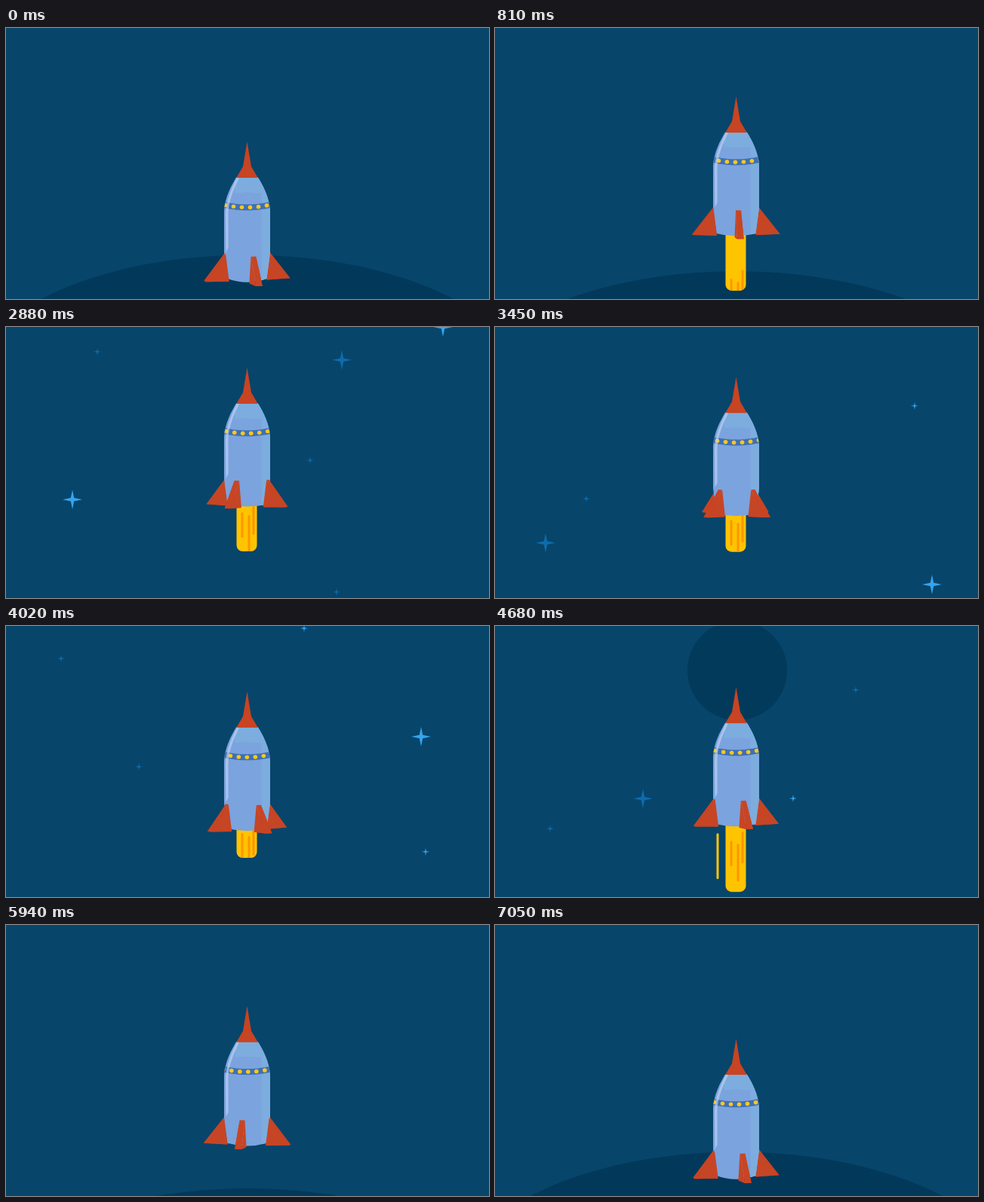
An HTML page with a canvas for the animation above (7.14 s loop, 640x360 px).

```html
<!DOCTYPE html>
<html>
<head>
<meta charset="utf-8">
<title>Rocket</title>
<style>
html, body { margin: 0; width: 100%; height: 100%; overflow: hidden; background: #07456b; }
canvas { display: block; }
</style>
</head>
<body>
<canvas id="stage" width="640" height="360"></canvas>
<script>
const c = document.getElementById('stage').getContext('2d');
const CX = 319.5, LOOP = 7140, LAST = 7050, STEP = 30, RAD = Math.PI / 180;
const SCROLL = 0.3424, JET = 0.2; // px per ms

// Key points: [time in ms, value]
const HEIGHT = [[0, 151], [1250, 68], [1900, 82], [2850, 54], [4460, 94], [5000, 58], [6800, 151]];
const SPIN = [[0, 0], [1740, 171], [4020, 464], [5940, 692], [7050, 810]];
const FLAME = [[200, 0], [900, 85], [2880, 60], [4020, 37], [4680, 88], [5300, 0]];

// Star layers; each star is [x, time at which it crosses the top edge]
const BRIGHT = '#35a4ee', DIM = '#0e6cac';
const LAYERS = [
  { r: 5, speed: SCROLL, color: DIM,
    stars: [[438, 1852], [403, 2363], [121, 2784], [176, 3474], [73, 3894], [478, 4432]] },
  { r: 5, speed: SCROLL, color: BRIGHT, stars: [[556, 3144], [395, 4011]] },
  { r: 13, speed: 0.6, color: DIM, stars: [[445, 2807], [67, 2972], [196, 4298]] },
  { r: 13, speed: 0.6, color: BRIGHT, stars: [[88, 2498], [579, 2880], [550, 3775], [50, 4052]] }
];

const linear = u => u;
const smooth = u => (1 - Math.cos(Math.PI * u)) / 2;
const mod = (a, n) => ((a % n) + n) % n;

function track(keys, t, ease = linear) {
  const i = keys.findIndex(k => t < k[0]);
  if (i < 0) return keys[keys.length - 1][1];
  if (i === 0) return keys[0][1];
  const [t0, a] = keys[i - 1], [t1, b] = keys[i];
  return a + (b - a) * ease((t - t0) / (t1 - t0));
}

function poly(points, color) {
  c.fillStyle = color;
  c.beginPath();
  points.forEach(p => c.lineTo(p[0], p[1]));
  c.closePath();
  c.fill();
}

function ellipse(x, y, rx, ry, color) {
  c.fillStyle = color;
  c.beginPath();
  c.ellipse(x, y, rx, ry, 0, 0, 7);
  c.fill();
}

function line(x, y0, y1, color) {
  c.strokeStyle = color;
  c.lineWidth = 3;
  c.lineCap = 'round';
  c.beginPath();
  c.moveTo(x, y0 + 1.5);
  c.lineTo(x, Math.max(y0 + 1.6, y1 - 1.5));
  c.stroke();
}

function star(x, y, r, color) {
  const points = [];
  for (let i = 0; i < 8; i++) {
    const a = i * 45 * RAD, d = i % 2 ? r * 0.24 : r;
    points.push([x + d * Math.cos(a), y + d * Math.sin(a)]);
  }
  poly(points, color);
}

function cloud(t) {
  const y = 233 + (t - 1740) * SCROLL;
  c.fillStyle = '#064061';
  c.beginPath();
  c.ellipse(39, y + 4, 12, 11, 0, 0, 7);
  c.ellipse(53, y - 3, 16, 14, 0, 0, 7);
  c.ellipse(70, y + 4, 14, 12, 0, 0, 7);
  c.rect(38, y + 4, 33, 11);
  c.fill();
}

function scenery(t) {
  c.fillStyle = '#07456b';
  c.fillRect(0, 0, 640, 360);
  cloud(t);
  for (const { r, speed, color, stars } of LAYERS) {
    for (const [x, start] of stars) star(x, (t - start) * speed, r, color);
  }
  ellipse(321, 59 + (t - 4680) * SCROLL, 66, 66, '#023a5b');
  const drop = t < LAST / 2 ? 3.3e-5 * t * t : 5.1e-5 * Math.max(0, 6916 - t) ** 2;
  ellipse(320, 301.5 + drop + 192, 380, 192, '#02385a');
}

// A streak that grows out of the engine and flows down; age in ms
function streak(x, base, from, age, size, limit, color) {
  const head = age * JET, top = Math.max(from, head - size);
  if (head > top && top < limit) line(x, base + top, base + Math.min(head, limit), color);
}

function flame(t, base) {
  const len = track(FLAME, t);
  if (len <= 0) return;
  streak(295, base, 10, mod(t - 1640, 2685), 61, 75, '#ffc60a');
  c.save();
  c.beginPath();
  c.roundRect(305.5, base - 10, 27, len + 10, [0, 0, 8, 8]);
  c.fillStyle = '#ffc400';
  c.fill();
  c.clip();
  [[313, 350, 34], [322, 250, 50], [328, 370, 42]].forEach(([x, birth, size]) =>
    streak(x, base, -3, mod(t - birth, 580), size, 100, '#ff9500'));
  c.restore();
}

function fin(angle, tip, tilt) {
  const s = Math.sin(angle * RAD), k = Math.cos(angle * RAD);
  const at = (r, h, off) => [CX + r * s + off * k, tip + h + tilt * (r * k - off * s) / 57];
  const side = w => [at(30.5, 148, w * 3.5), at(58, 183, w * 4.5), at(26, 184, w * 4.5)];
  const a = side(-1), b = side(1);
  const [near, far] = s > 0 ? [a, b] : [b, a];
  poly(far, '#b93c20');
  poly([a[1], b[1], b[2], a[2]], '#b93c20');
  poly(near, '#c64525');
  poly([a[0], b[0], b[1], a[1]], '#c84523');
}

function bodyPath(tip, sag) {
  const l = CX - 30.5, r = CX + 30.5;
  c.beginPath();
  c.moveTo(CX - 14, tip + 47);
  c.bezierCurveTo(CX - 21, tip + 58, CX - 29.5, tip + 74, l, tip + 92);
  c.lineTo(l, tip + 148);
  c.lineTo(CX - 26, tip + 182);
  c.quadraticCurveTo(CX, tip + 182 + sag * 2, CX + 26, tip + 182);
  c.lineTo(r, tip + 148);
  c.lineTo(r, tip + 92);
  c.bezierCurveTo(CX + 29.5, tip + 74, CX + 21, tip + 58, CX + 14, tip + 47);
  c.closePath();
}

function body(tip, tilt, spin) {
  c.save();
  bodyPath(tip, tilt * 0.53);
  c.fillStyle = '#7ba3de';
  c.fill();
  c.clip();

  // Shading
  c.fillStyle = '#7dadde';
  c.fillRect(CX + 19, tip + 47, 14, 140);
  c.fillRect(CX - 16, tip + 47, 36, 21);
  ellipse(CX, tip + 73, 16, 6, '#7ba3de');

  // Band, with evenly spaced windows sliding along it
  const bandY = x => tip + 87.3 - 3.3 * (x / 30) ** 2;
  c.strokeStyle = '#3f70b4';
  c.lineWidth = 8;
  c.beginPath();
  for (let x = -32; x <= 32; x += 4) c.lineTo(CX + x, bandY(x));
  c.stroke();
  const gap = 11, shift = mod(4 + spin * gap / 22.5, gap);
  for (let x = shift - 3 * gap; x < 33; x += gap) ellipse(CX + x, bandY(x), 2.8, 2.7, '#ffc81c');

  // Highlight along the left edge
  c.fillStyle = 'rgba(190,211,243,.68)';
  c.beginPath();
  c.moveTo(CX - 13, tip + 47);
  c.lineTo(CX - 10, tip + 47);
  c.bezierCurveTo(CX - 17, tip + 62, CX - 25, tip + 78, CX - 25, tip + 96);
  c.lineTo(CX - 25, tip + 141);
  c.lineTo(CX - 28, tip + 147);
  c.lineTo(CX - 28.5, tip + 96);
  c.bezierCurveTo(CX - 28, tip + 78, CX - 20, tip + 60, CX - 13, tip + 47);
  c.fill();
  c.restore();

  poly([[CX, tip], [CX + 5.5, tip + 33], [CX + 14.3, tip + 48],
        [CX - 14.3, tip + 48], [CX - 5.5, tip + 33]], '#c84422');
}

function rocket(t) {
  const tip = track(HEIGHT, t, smooth), tilt = 2 + tip * 0.047, spin = track(SPIN, t);
  const depth = a => Math.cos(a * RAD);
  const fins = [0, 90, 180, 270].map(a => a + 16 + spin).sort((a, b) => depth(a) - depth(b));
  flame(t, tip + 184);
  fins.filter(a => depth(a) < 0).forEach(a => fin(a, tip, tilt));
  body(tip, tilt, spin);
  fins.filter(a => depth(a) >= 0).forEach(a => fin(a, tip, tilt));
}

function draw() {
  const t = Math.min(LAST, Math.floor(performance.now() % LOOP / STEP) * STEP);
  scenery(t);
  rocket(t);
  requestAnimationFrame(draw);
}
draw();
</script>
</body>
</html>
```
